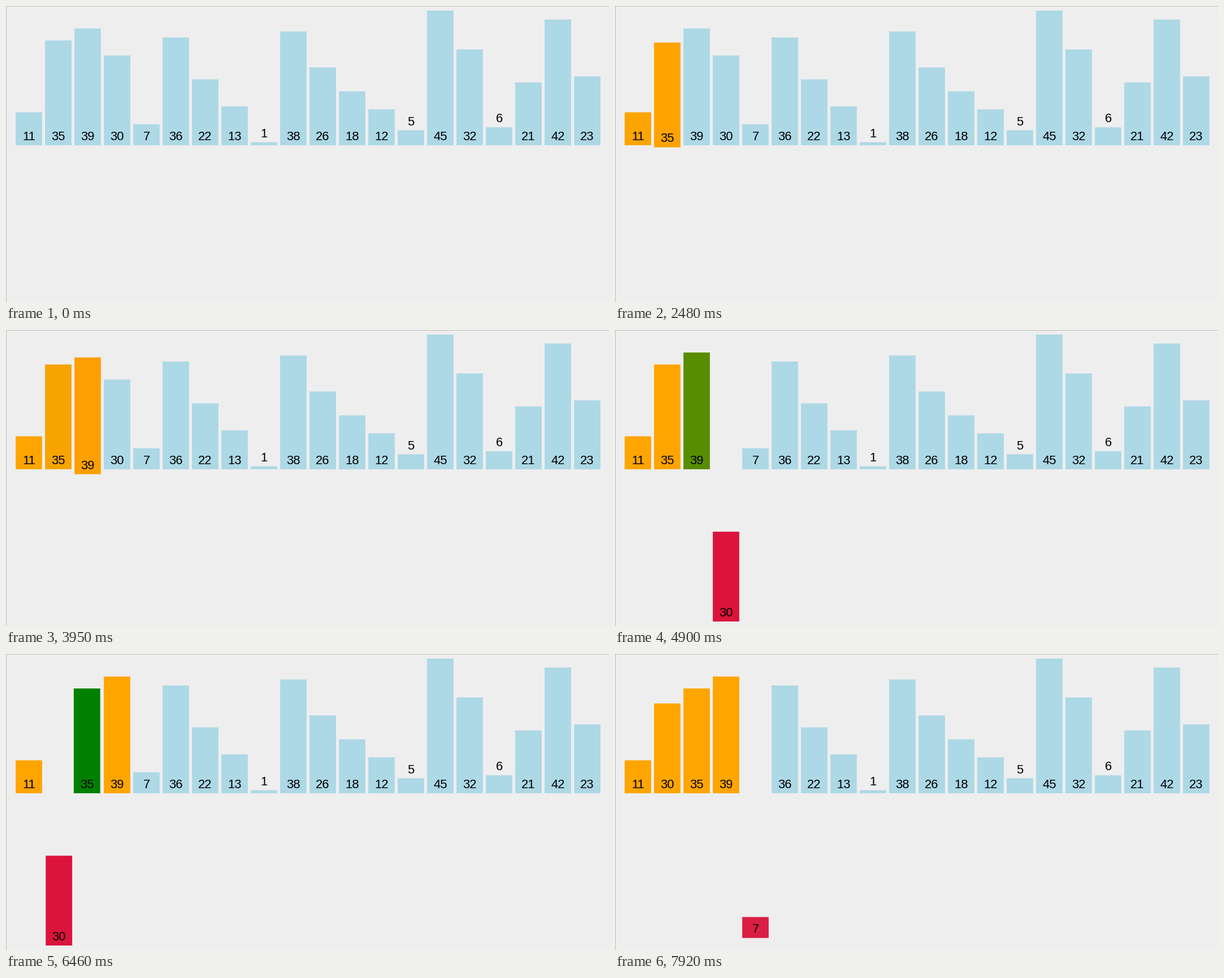
A matplotlib script for the animation above (8000 ms loop, 1067x525 px).

```python
import matplotlib.pyplot as plt
from matplotlib.animation import FuncAnimation
from matplotlib.colors import to_rgb
from matplotlib.patches import Rectangle

W, H, DPI = 1067, 525, 100
LOOP_MS, TICK_MS = 8000, 20

# The sort advances at a steady pace and is repainted on a coarser clock.
FIRST_MS, STEP_MS, MOVE_MS = 751, 498.2, 250
REPAINT_MS, REPAINT_PHASE = 78, 40

VALUES = [11, 35, 39, 30, 7, 36, 22, 13, 1, 38,
          26, 18, 12, 5, 45, 32, 6, 21, 42, 23]
LEFT, PITCH, BAR_W = 17.1, 52, 46.8
BASE, UNIT, DROP = 247, 5.31, 270
TALL_ENOUGH = 7  # smaller values carry their label above the bar

IDLE, DONE, CHECK, KEY = map(to_rgb, ("lightblue", "orange", "green", "crimson"))


def insertion_sort(values):
    """Yield, step by step, the new {value: (slot, drop, colour)}."""
    order = list(values)
    yield {order[0]: (0, 0, DONE)}
    for i in range(1, len(order)):
        key, j = order[i], i
        yield {key: (i, DROP, KEY)}
        settled = {}
        while j > 0:
            left = order[j - 1]
            yield {**settled, left: (j - 1, 0, CHECK)}
            settled = {left: (j - 1, 0, DONE)}
            if left < key:
                break
            yield {key: (j - 1, DROP, KEY), left: (j, 0, CHECK)}
            settled = {left: (j, 0, DONE)}
            order[j - 1:j + 1] = key, left
            j -= 1
        yield {**settled, key: (j, 0, DONE)}


def ease(p):
    """Cubic in-out."""
    p = min(p, 1)
    return 4 * p ** 3 if p < 0.5 else 1 - 4 * (1 - p) ** 3


def mix(a, b, f):
    return a + (b - a) * f


def blend(old, new, f):
    colour = tuple(mix(a, b, f) for a, b in zip(old[2], new[2]))
    return mix(old[0], new[0], f), mix(old[1], new[1], f), colour


def layout(ms):
    """Slot, drop and colour of every bar at a given time."""
    now = REPAINT_PHASE + (ms - REPAINT_PHASE) // REPAINT_MS * REPAINT_MS
    bars = {v: (i, 0, IDLE) for i, v in enumerate(VALUES)}
    for n, changes in enumerate(insertion_sort(VALUES)):
        elapsed = now - FIRST_MS - n * STEP_MS
        if elapsed <= 0:
            break
        f = ease(elapsed / MOVE_MS)
        for v, goal in changes.items():
            bars[v] = blend(bars[v], goal, f)
    return bars


fig = plt.figure(figsize=(W / DPI, H / DPI), dpi=DPI, facecolor="#eeeeee")
ax = fig.add_axes([0, 0, 1, 1])
ax.set_xlim(0, W)
ax.set_ylim(H, 0)
ax.axis("off")

for size in ((W, 1), (1, H)):
    ax.add_patch(Rectangle((0, 0), *size, fc="#bbbbbb", lw=0))

rects, labels = {}, {}
for v in VALUES:
    rects[v] = ax.add_patch(Rectangle((0, 0), BAR_W, v * UNIT, lw=0, snap=False))
    labels[v] = ax.text(0, 0, str(v), family="Liberation Sans", size=22 * 72 / DPI,
                        color="black", ha="center", va="baseline", zorder=3)


def draw(i):
    for v, (slot, drop, colour) in layout(i * TICK_MS).items():
        x, bottom = LEFT + PITCH * slot, BASE + drop
        top = bottom - v * UNIT
        rects[v].set_xy((x, top))
        rects[v].set_facecolor(colour)
        baseline = bottom - 9.2 if v >= TALL_ENOUGH else top - 8.7
        labels[v].set_position((x + BAR_W / 2, baseline))
    return [*rects.values(), *labels.values()]


anim = FuncAnimation(fig, draw, frames=LOOP_MS // TICK_MS, interval=TICK_MS,
                     init_func=lambda: draw(0), repeat=True)
plt.show()
```
